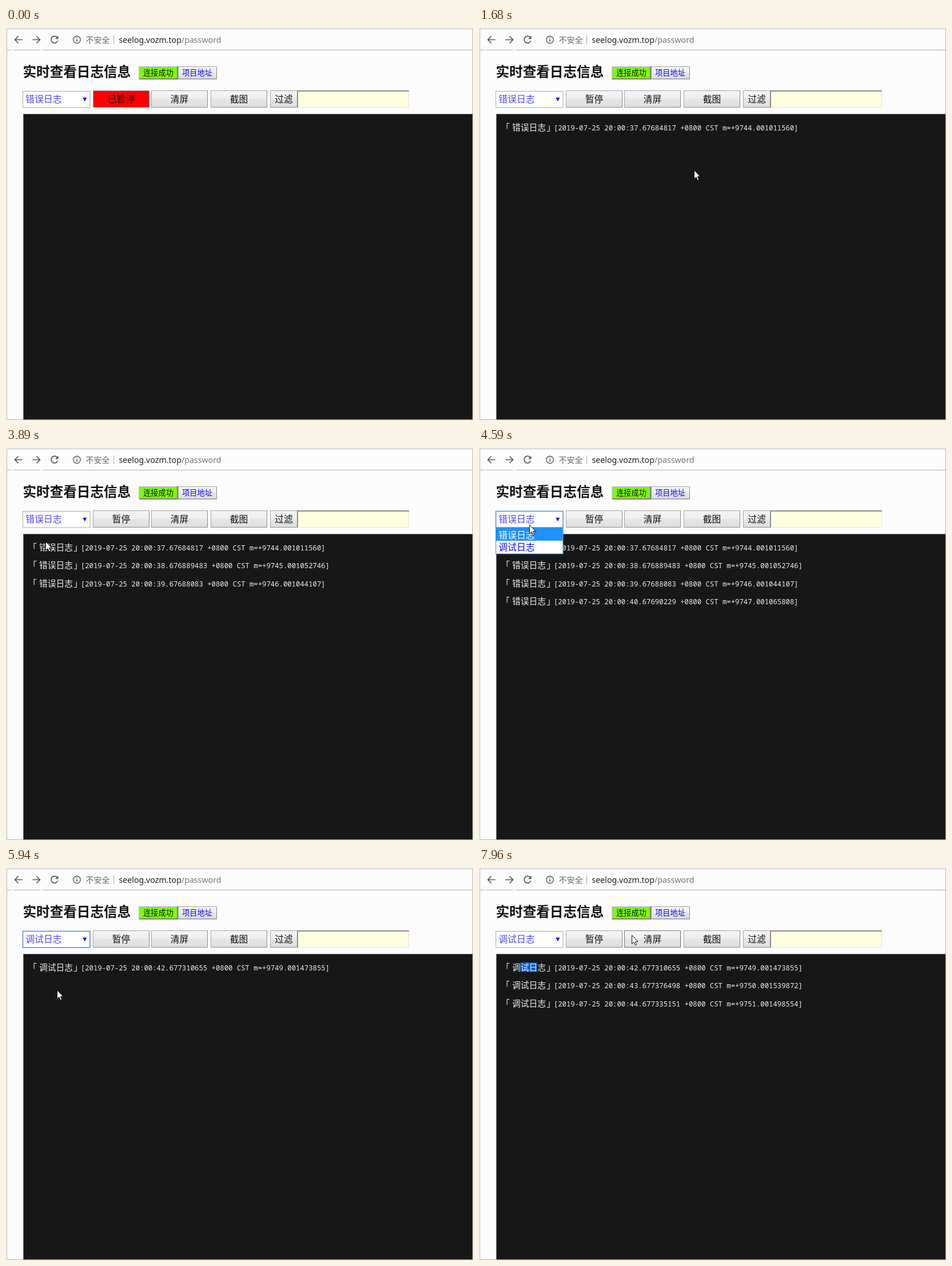
An HTML page for the animation above (8000 ms loop, 817x685 px).

```html
<!DOCTYPE html>
<html lang="zh-CN">
<head>
<meta charset="utf-8">
<title>实时查看日志信息</title>
<style>
  html, body { margin: 0; width: 100%; height: 100%; overflow: hidden; background: #fff; }
  svg { display: block; width: 817px; height: 685px; }
  text { font-family: "Noto Sans CJK SC", "Noto Sans CJK", sans-serif; white-space: pre; }
  .url { font: 14.2px "Noto Sans", sans-serif; }
  .btn { font-size: 15.8px; text-anchor: middle; fill: #111; }
  .small { font-size: 13.2px; text-anchor: middle; }
  .pick { font-size: 15.8px; fill: #1408f0; }
  .tag { font-size: 14.72px; font-weight: 300; fill: #eee; }
  .stamp { font: 12.3px "Noto Sans Mono", "Liberation Mono", monospace; fill: #eee; }
  .icon { fill: none; stroke: #54575b; stroke-width: 1.7; }
</style>
</head>
<body>
<svg viewBox="0 0 817 685">
  <defs>
    <linearGradient id="face" x2="0" y2="1">
      <stop offset="0" stop-color="#f4f4f4"/>
      <stop offset=".5" stop-color="#eeeeee"/>
      <stop offset=".5" stop-color="#e4e6e6"/>
      <stop offset="1" stop-color="#dedede"/>
    </linearGradient>
  </defs>

  <rect width="817" height="685" fill="#fff"/>
  <rect x="1.5" y="1.5" width="815" height="683" fill="#fcfcfc" stroke="#b4b4b4"/>
  <path d="M2 38.5H10M13 38.5H60M64 38.5H816" stroke="#b0b0b0"/>

  <g class="icon">
    <path d="M28.5 20.5H15.5M21.5 14.5L15.5 20.5L21.5 26.5"/>
    <path d="M46.5 20.5H59.5M53.5 14.5L59.5 20.5L53.5 26.5"/>
    <path d="M89.6 16.4A6 6 0 1 0 90.6 22.3"/>
    <circle cx="124" cy="20.5" r="6.2" stroke-width="1.4"/>
    <path d="M124 19.5V24M124 16.6V18" stroke-width="1.5"/>
  </g>
  <path d="M86 19.3H91.5V13.8Z" fill="#54575b"/>
  <text x="139.5" y="25.5" font-size="14" fill="#66696d">不安全</text>
  <path d="M188.5 13V28" stroke="#aaa"/>
  <text class="url" x="197.5" y="25.5" fill="#222">seelog.vozm.top<tspan fill="#777">/password</tspan></text>

  <text x="29.5" y="84.5" font-size="23.6" font-weight="700" fill="#111">实时查看日志信息</text>
  <rect x="232.5" y="67" width="68.5" height="23" fill="#7cfc00"/>
  <path d="M233.5 90V68H301" fill="none" stroke="#bbb" stroke-width="2"/>
  <path d="M233 89H300V67" fill="none" stroke="#808080" stroke-width="2"/>
  <text class="small" x="266.5" y="83.3" fill="#111">连接成功</text>
  <rect x="301.5" y="67.5" width="67" height="21.5" fill="url(#face)" stroke="#a8a8a8"/>
  <path d="M301.5 89H368.5V68" fill="none" stroke="#888"/>
  <text class="small" x="334.5" y="83.3" fill="#0a0af0">项目地址</text>

  <rect id="box" x="29.5" y="110.5" width="117.5" height="28.5" fill="#fff"/>
  <text id="value" class="pick" x="34.3" y="130.3" style="fill:#5046f2"></text>
  <path d="M134.3 121.7H141.3L137.8 128.2Z" fill="#0a0af0"/>
  <g id="buttons"></g>
  <rect x="509" y="109" width="196" height="30" fill="#ffffe0"/>
  <path d="M510 138.5H704.5V110" fill="none" stroke="#e4e4dc"/>
  <path d="M510 139V110H705" fill="none" stroke="#8c8c8c" stroke-width="2"/>

  <rect x="30" y="150" width="786" height="534" fill="#171717"/>
  <path d="M30.5 684V150.5H816" fill="none" stroke="#666"/>
  <rect id="select" x="72.4" y="165" height="16.5" fill="#0b5cd5"/>
  <g id="log"></g>

  <g id="menu">
    <rect x="29.5" y="139.5" width="117.5" height="45.5" fill="#fff" stroke="#3c86dc"/>
    <rect id="mark" x="30" y="140" width="116.5" height="22" fill="#1e90ff"/>
    <text id="opt0" class="pick" x="34.3" y="157.5">错误日志</text>
    <text id="opt1" class="pick" x="34.3" y="179.3">调试日志</text>
  </g>

  <g id="cursor">
    <path id="arrow" d="M0 0V15.2L3.5 12L5.9 17.4L8.3 16.3L5.9 11.2H10.6Z" fill="#fff" stroke="#111"/>
    <path id="beam" d="M-3.5 -8H-1L0 -7L1 -8H3.5M0 -7V7M-3.5 8H-1L0 7L1 8H3.5" fill="none" stroke="#ddd" stroke-width="1.1"/>
  </g>
</svg>
<script>
const LOOP = 8000, ERR = "错误日志", DBG = "调试日志";
const CLEARED = 4960, SWITCHED = 5180;
const $ = id => document.getElementById(id);
const within = (t, a, b) => t >= a && t < b;
const show = (el, on) => { el.style.display = on ? "" : "none"; };

function add(parent, tag, attrs, text = "") {
  const el = document.createElementNS("http://www.w3.org/2000/svg", tag);
  for (const key in attrs) el.setAttribute(key, attrs[key]);
  el.textContent = text;
  return parent.appendChild(el);
}

function button(x, w, label) {
  const g = $("buttons");
  return {
    left: x,
    face: add(g, "rect", { x: x + .5, y: 109.5, width: w, height: 29, fill: "url(#face)" }),
    edge: add(g, "path", { d: `M${x} 138.5H${x + w + .5}V110`, fill: "none" }),
    text: add(g, "text", { class: "btn", x: x + w / 2 + .5, y: 130.3 }, label)
  };
}
const buttons = [button(152, 98, ""), button(254, 98, "清屏"), button(358, 98, "截图"), button(462, 47, "过滤")];
const pause = buttons[0];

// One log line per second: fraction of the second and monotonic clock
const rows = [
  "67684817 9744.001011560", "676889483 9745.001052746",
  "67688083 9746.001044107", "67690229 9747.001065808",
  "676936441 9748.001099711", "677310655 9749.001473855",
  "677376498 9750.001539872", "677335151 9751.001498554"
].map((clock, i) => {
  const [frac, mono] = clock.split(" ");
  const from = 1340 + 905 * i;
  const to = from < CLEARED ? CLEARED : from < SWITCHED ? SWITCHED : LOOP;
  const row = i < 4 ? i : Math.max(0, i - 5);
  const g = add($("log"), "g", { transform: `translate(0 ${178.8 + row * 31.4})` });
  add(g, "text", { class: "tag", x: 39 }, "「");
  add(g, "text", { class: "tag", x: 58 }, i < 5 ? ERR : DBG);
  add(g, "text", { class: "tag", x: 118.5 }, "」");
  add(g, "text", { class: "stamp", x: 130.8 },
    `[2019-07-25 20:00:${37 + i}.${frac} +0800 CST m=+${mono}]`);
  return { g, from, to };
});

// Pointer moves: start, end, x, y, sideways bend
const moves = [
  [30, 830, 207, 122, -14],
  [980, 1680, 376, 248, 24],
  [1730, 1890, 375, 256],
  [2440, 3100, 186, 204],
  [3150, 3240, 104, 204],
  [3290, 3540, 65, 170],
  [3680, 4440, 88, 134],
  [4600, 4950, 78, 171],
  [5320, 6110, 90, 219],
  [6200, 6600, 69, 174],
  [7180, 7400, 102, 174],
  [7420, 7960, 267, 117]
];

function pointer(t) {
  let x = 59, y = 684;
  for (const [from, to, x1, y1, bend = 0] of moves) {
    if (t < from) break;
    const p = Math.min(1, (t - from) / (to - from));
    const k = p * p * (3 - 2 * p);
    const dx = x1 - x, dy = y1 - y;
    const side = bend * Math.sin(Math.PI * k) / Math.hypot(dx, dy);
    x += dx * k - dy * side;
    y += dy * k + dx * side;
  }
  return [Math.round(x), Math.round(y)];
}

function draw(t) {
  const [x, y] = pointer(t);
  const typing = within(t, 3000, 3640) || within(t, 6480, 7450);
  $("cursor").setAttribute("transform", `translate(${x + .5} ${y + .5})`);
  show($("cursor"), t >= 30);
  show($("arrow"), !typing);
  show($("beam"), typing);

  const paused = t < 930;
  for (const b of buttons) {
    const hover = within(x, b.left, b.left + 98) && within(y, 109, 139);
    b.face.setAttribute("stroke", hover ? "#777" : "#a4a4a4");
    b.edge.setAttribute("stroke", hover ? "#666" : "#8a8a8a");
  }
  pause.text.textContent = paused ? "已暂停" : "暂停";
  pause.face.setAttribute("fill", paused ? "#f00" : "url(#face)");

  const focus = within(t, 4540, 6560);
  $("box").setAttribute("stroke", focus ? "#5b8fdc" : "#a9a9a9");
  $("box").setAttribute("stroke-width", focus ? 1.6 : 1);
  $("value").textContent = t < SWITCHED ? ERR : DBG;

  const second = y > 155;
  show($("menu"), within(t, 4540, SWITCHED));
  $("mark").setAttribute("y", second ? 162 : 140);
  $("opt0").style.fill = second ? "" : "#fff";
  $("opt1").style.fill = second ? "#fff" : "";

  for (const r of rows) show(r.g, within(t, r.from, r.to));
  const picked = t < 7180 ? 0 : Math.min(2, Math.floor((x - 69) / 14));
  $("select").setAttribute("width", 14.72 * picked);
}

const start = performance.now();
function tick() {
  draw((performance.now() - start) % LOOP);
  requestAnimationFrame(tick);
}
tick();
</script>
</body>
</html>
```
